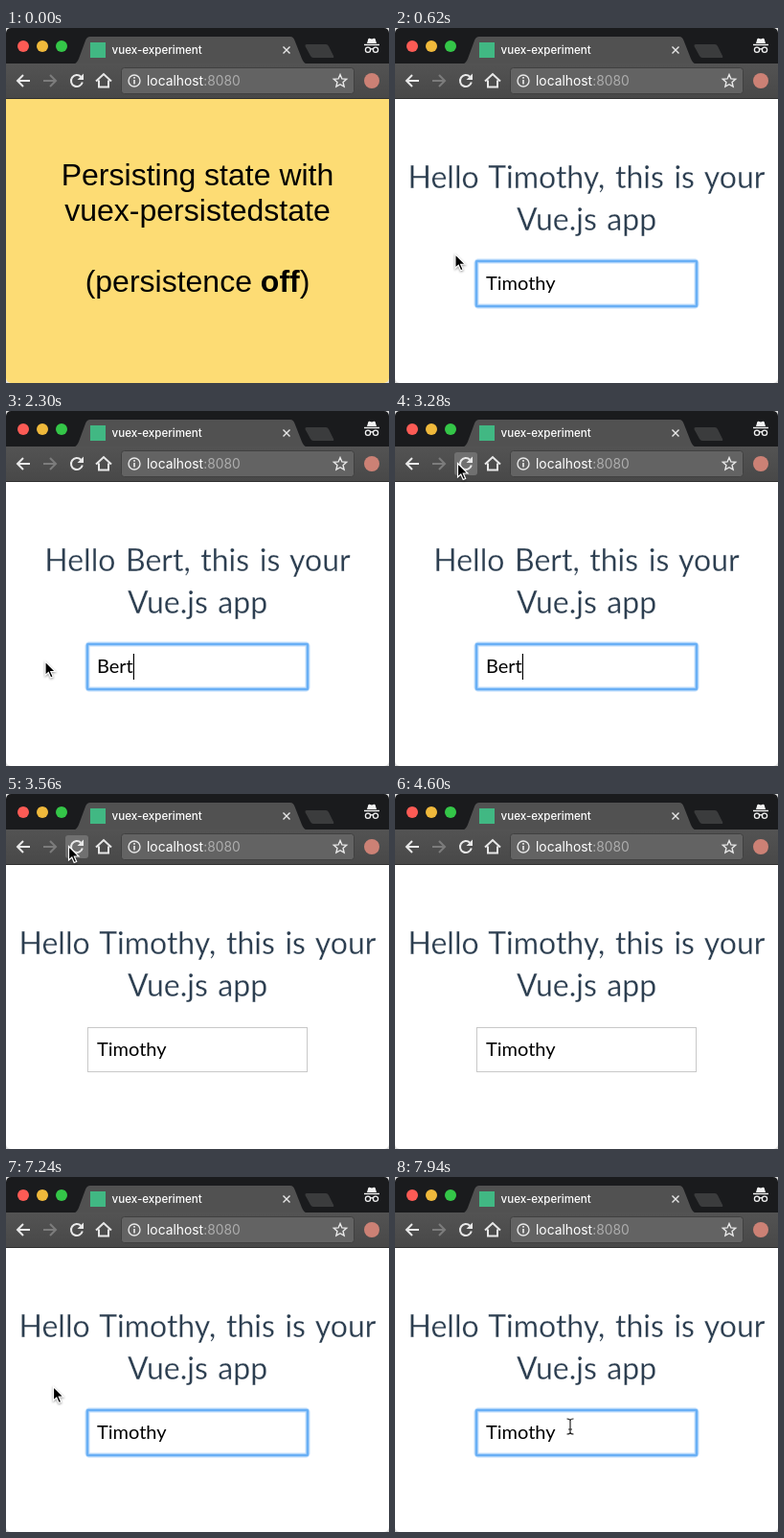
These frames come from a looping animation (400x370 px, 8000 ms). An HTML page:

```html
<!DOCTYPE html>
<html lang="en">
<head>
<meta charset="utf-8">
<title>vuex-experiment</title>
<style>
html, body { margin: 0; height: 100%; overflow: hidden; background: #ddd; }
svg { display: block; width: 100vw; height: 100vh; }
.ui { font-family: Inter, Roboto, sans-serif; fill: #fff; }
.card { font: 32px "Liberation Sans", Arial, sans-serif; text-anchor: middle; }
/* the white stroke thins the glyphs a little */
.head { font: 32px Lato, sans-serif; word-spacing: 2.4px; text-anchor: middle; fill: #2c3e50; stroke: #fff; stroke-width: .3px; }
.field { font: 20px Lato, sans-serif; }
.icon { fill: none; stroke: #e8e8e8; stroke-width: 2; }
.thin { stroke-width: 1.4; }
#arrow { filter: drop-shadow(0 1px 1px #0006); }
</style>
</head>
<body>
<svg viewBox="0 0 400 370">
  <defs>
    <linearGradient id="bar" x2="0" y2="1"><stop stop-color="#535353"/><stop offset="1" stop-color="#484848"/></linearGradient>
    <clipPath id="win"><rect width="400" height="370" rx="5"/></clipPath>
  </defs>
  <g clip-path="url(#win)">
    <rect width="400" height="370" fill="#fff"/>

    <!-- tab strip -->
    <rect width="400" height="38" fill="#1a1b1d"/>
    <path d="M70 38Q74 37 76 32L83 13Q84.5 9 88 9H297Q300 9 301.5 13L309 32Q311 37 315 38Z" fill="#515151"/>
    <path d="M314 17H334Q336 17 337 19L342 29Q343 31 341 31H321Q319 31 318 29L312.5 19Q312 17 314 17Z" fill="#3b3c3d"/>
    <circle cx="18" cy="19" r="6" fill="#fc5b55"/>
    <circle cx="38" cy="19" r="6" fill="#f0b93b"/>
    <circle cx="58" cy="19" r="6" fill="#34c648"/>
    <rect id="favicon" x="88" y="15" width="16" height="16" fill="#41b883"/>
    <text class="ui" x="110.5" y="27" font-size="11.6" font-weight="500">vuex-experiment</text>
    <path d="M289.5 19.5l7 7m0-7l-7 7" class="icon thin"/>
    <g fill="#f2f2f2">
      <path d="M377 16L378.3 11.5Q378.7 10.5 379.7 10.8L382 11.4 384.3 10.8Q385.3 10.5 385.7 11.5L387 16Z"/>
      <rect x="374" y="16.8" width="16" height="1.4"/>
      <g fill="none" stroke="#f2f2f2" stroke-width="1.3"><circle cx="378" cy="22.7" r="2.6"/><circle cx="386" cy="22.7" r="2.6"/><path d="M380.7 22.2q1.3-1 2.6 0"/></g>
    </g>

    <!-- toolbar -->
    <rect y="37" width="400" height="36" fill="url(#bar)"/>
    <rect y="73" width="400" height="1" fill="#303030"/>
    <rect id="hover" y="43" width="24" height="24" rx="3" fill="#707070"/>
    <path class="icon" d="M25 55H12.5M18 49l-6 6 6 6"/>
    <path class="icon" d="M39 55H51.5M46 49l6 6-6 6" style="stroke:#7c7c7c"/>
    <g id="reload"><path class="icon" d="M78.2 50.8A6 6 0 1 0 79.8 56.5"/><path d="M81 47.5V54H74.5Z" fill="#e8e8e8"/></g>
    <path id="stop" class="icon" d="M69 50l10 10m0-10l-10 10"/>
    <path class="icon" d="M94 55.5L102 48l8 7.5M97 54.5V61.5H107V54.5"/>
    <rect x="120.5" y="41.5" width="243" height="27" rx="3" fill="#636363" stroke="#404040"/>
    <circle class="icon thin" cx="134" cy="55" r="6"/>
    <path d="M134 54v4.5M134 51v1.7" stroke="#eee" stroke-width="1.6"/>
    <text class="ui" x="147" y="60" font-size="13.85">localhost<tspan fill="#adadad">:8080</tspan></text>
    <path id="star" class="icon thin"/>
    <circle cx="382" cy="55" r="8" fill="#cc8175"/>

    <!-- title card -->
    <g id="card" class="card">
      <rect y="74" width="400" height="296" fill="#fddc74"/>
      <text x="200" y="164">Persisting state with</text>
      <text x="200" y="201">vuex-persistedstate</text>
      <text x="200" y="275">(persistence <tspan id="mode" font-weight="700"></tspan>)</text>
    </g>

    <!-- app page -->
    <g id="app">
      <text id="line1" class="head" x="200" y="167"></text>
      <text id="line2" class="head" x="200" y="211"></text>
      <rect x="85.5" y="243.5" width="229" height="46" fill="#fff" stroke="#c8c8c8"/>
      <g id="focus" fill="none" stroke="#69aff5">
        <rect x="85" y="243" width="230" height="47" rx="2" stroke-width="5" opacity=".4"/>
        <rect x="85" y="243" width="230" height="47" rx="1" stroke-width="2.6"/>
      </g>
      <rect id="mark" y="254" height="26" fill="#b3d7fd"/>
      <text id="value" class="field" x="95" y="273"></text>
      <rect id="caret" y="253" width="1.2" height="27"/>
    </g>

    <path id="arrow" d="M0 0V14.5L3.3 11.5 5.7 17 8.2 16 5.8 10.5H10.5Z" stroke="#fff" stroke-width="1.2"/>
    <path id="beam" d="M-3.5-8Q0-8 0-6Q0-8 3.5-8M0-6V6M-3.5 8Q0 8 0 6Q0 8 3.5 8M-2 3H2" fill="none" stroke="#222" stroke-width="1.2"/>
  </g>
</svg>
<script>
const LOOP = 8000, FIRST = 'Timothy', TYPED = 'Bert';
const KEYS = [1880, 2060, 2180, 2300];
const el = {};
document.querySelectorAll('[id]').forEach(e => el[e.id] = e);

const show = (e, on) => e.style.display = on ? '' : 'none';
const put = (e, text) => { if (e.textContent !== text) e.textContent = text; };
const within = (t, a, b) => t >= a && t < b;

el.star.setAttribute('d', 'M' + Array.from({ length: 10 }, (_, i) => {
  const a = i * Math.PI / 5, r = i % 2 ? 3.2 : 7;
  return (349 + r * Math.sin(a)).toFixed(2) + ' ' + (55.5 - r * Math.cos(a)).toFixed(2);
}).join('L') + 'Z');

// Pointer moves: start, end, from, bend, to
const moves = [
  [500, 900, [49.5, 218.5], [70, 263], [183, 261]],
  [940, 1300, [183, 261], [110, 262], [41, 261]],
  [2580, 3280, [41, 261], [18, 150], [65.5, 54.5]],
  [4380, 4600, [65.5, 54.5], [92, 54], [114, 55]],
  [7520, 7940, [49.5, 218.5], [70, 262], [183, 260]]
];

function pointer(t) {
  const m = t >= 7240 ? moves[4] : moves.filter(n => t >= n[0]).pop() || moves[0];
  const p = Math.min(1, Math.max(0, (t - m[0]) / (m[1] - m[0])));
  const k = p * p * (3 - 2 * p), j = 1 - k;
  return [0, 1].map(i => j * j * m[2][i] + 2 * j * k * m[3][i] + k * k * m[4][i]);
}

function draw(t) {
  const card = t < 500 || within(t, 5280, 7240);
  const loading = within(t, 3400, 3500);
  const typing = within(t, 1600, 3400);
  const count = KEYS.filter(k => t >= k).length;
  const name = typing ? TYPED.slice(0, count) : FIRST;
  const short = typing && count < 3;

  show(el.card, card);
  put(el.mode, t < 500 ? 'off' : 'on');
  show(el.app, !card && !loading);
  show(el.favicon, !loading);
  show(el.reload, !loading);
  show(el.stop, loading);

  put(el.line1, `Hello ${name}, this is your${short ? ' Vue.js' : ''}`);
  put(el.line2, short ? 'app' : 'Vue.js app');
  put(el.value, name);
  show(el.focus, !within(t, 3500, 5280));

  const end = 95 + (name && !card && !loading ? el.value.getComputedTextLength() : 0);
  show(el.caret, typing);
  el.caret.setAttribute('x', end);

  const [x, y] = pointer(t);
  const left = Math.min(end, Math.max(95, x));
  show(el.mark, within(t, 940, 1600));
  el.mark.setAttribute('x', left);
  el.mark.setAttribute('width', end - left);

  const live = within(t, 500, 4600) || t >= 7240;
  const inField = x > 85 && x < 315 && y > 243 && y < 290;
  show(el.arrow, live && !inField);
  show(el.beam, live && inField);
  for (const e of [el.arrow, el.beam]) e.setAttribute('transform', `translate(${x} ${y})`);

  show(el.hover, live && y < 68 && y > 42);
  el.hover.setAttribute('x', x < 88 ? 62 : 90);
}

const start = performance.now();
function tick() {
  draw((performance.now() - start) % LOOP);
  requestAnimationFrame(tick);
}
tick();
</script>
</body>
</html>
```
